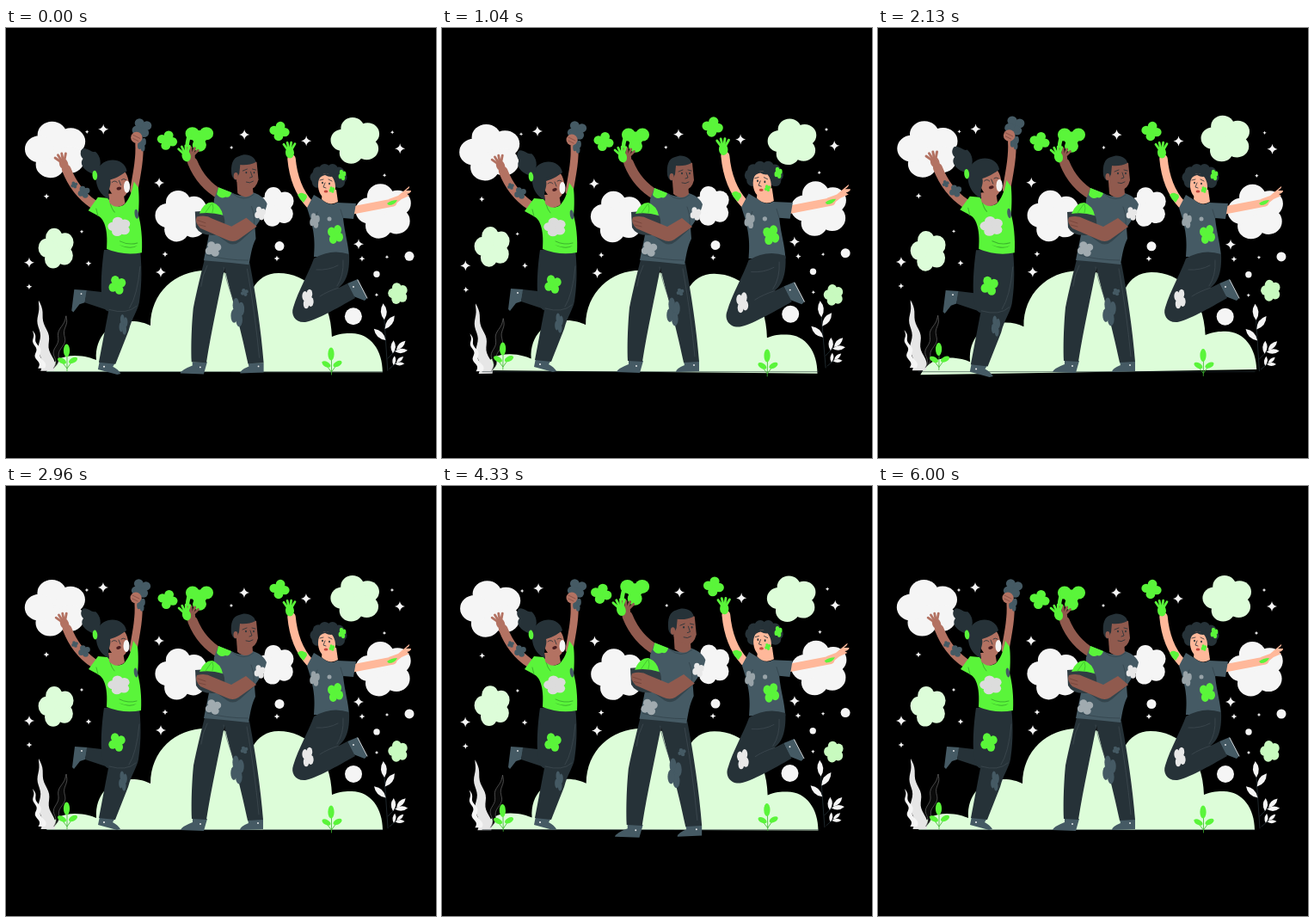
Write an HTML page that moves like this. It is 500 px wide and 500 px high and loops after 6.04 s.

```html
<!DOCTYPE html>
<html lang="en">
<head>
<meta charset="utf-8">
<title>Celebration</title>
<style>
html, body { margin: 0; height: 100%; overflow: hidden; background: #000; }
svg { display: block; width: 100vw; height: 100vh; }
</style>
</head>
<body>
<svg id="stage" viewBox="0 0 500 500"></svg>
<script>
const GREEN = '#5af53a', LEAF = '#3cb52d', MINT = '#ddfdd9', WHITE = '#f5f5f5', GREY = '#dcdcdc', DARK = '#263238',
  SLATE = '#455a64', FOLD = '#34454d', TAN = '#b37262', BROWN = '#905a4e', PEACH = '#ffb89a';

const fill = (color, d) => `<path fill="${color}" d="${d}"/>`;
const line = (color, width, d) =>
  `<path fill="none" stroke="${color}" stroke-width="${width}" stroke-linecap="round" stroke-linejoin="round" d="${d}"/>`;
const oval = (color, x, y, rx, ry = rx, turn = 0) =>
  `<ellipse fill="${color}" rx="${rx}" ry="${ry}" transform="translate(${x} ${y}) rotate(${turn})"/>`;
const repeat = (n, make) => Array.from({ length: n }, (_, i) => make(i)).join('');
const group = (id, ...parts) => `<g id="${id}">${parts.join('')}</g>`;

// A blob of half-size w by h: round lobes on a ring.
const puff = (color, x, y, w, h, turn = -105, n = 5) => oval(color, x, y, w * .5, h * .5) + repeat(n, i => {
  const a = turn * Math.PI / 180 + i * 2 * Math.PI / n;
  return oval(color, x + Math.cos(a) * w * .55, y + Math.sin(a) * h * .55, w * .47, h * .47);
});
const stain = (color, x, y, w, h = w, turn = -115) => puff(color, x, y, w, h, turn, 4);

const hand = (color, x, y, turn) => `<g transform="translate(${x} ${y}) rotate(${turn})">` +
  oval(color, 0, 0, 5, 6.5) +
  repeat(4, i => `<g transform="rotate(${i * 22 - 33})">${line(color, 2.8, 'M0 -3V-12')}</g>`) + '</g>';

const star = (x, y, r) => fill(WHITE, `M${x} ${y - r}` +
  [[1, -1, r, 0], [1, 1, 0, r], [-1, 1, -r, 0], [-1, -1, 0, -r]].map(([sx, sy, dx, dy]) =>
    `Q${x + sx * r * .13} ${y + sy * r * .13} ${x + dx} ${y + dy}`).join(''));
const stars = (r, points) => points.split(' ').map(p => star(...p.split(',').map(Number), r)).join('');

const leaf = (x, y, size, turn) => `<path fill="${WHITE}" transform="translate(${x} ${y}) rotate(${turn})"
  d="M0 0Q${size * .36} ${-size / 2} 0 ${-size}Q${-size * .36} ${-size / 2} 0 0"/>`;

// A twig with leaves on alternate sides and one at its tip.
const sprig = (x, y, x2, y2, size) => {
  const lean = Math.atan2(x2 - x, y - y2) * 180 / Math.PI;
  const at = (t, turn) => leaf(x + (x2 - x) * t, y + (y2 - y) * t, size, lean + turn);
  return line(DARK, .8, `M${x} ${y}L${x2} ${y2}`) + at(.6, -42) + at(.82, 40) + at(1, 0);
};

// A wavy blade that widens from its tip to the root.
const blade = (style, x, y, x2, y2, width, bulge = .7) => {
  const side = s => Array.from({ length: 25 }, (_, i) => {
    const t = i / 24, half = width * (bulge < 0 ? Math.sin(t * Math.PI) : t ** bulge);
    return `${x + (x2 - x) * t + Math.sin(t * 16) * 2 * t ** .3 + s * half} ${y + (y2 - y) * t}`;
  });
  return `<path ${style} d="M${[...side(-1), ...side(1).reverse()].join('L')}Z"/>`;
};

const sprout = (x, y) =>
  line(LEAF, .8, `M${x} ${y}v25m-7 -12l7 9l7 -10`) +
  oval(GREEN, x - .5, y + 1, 3.6, 7.5) + oval(GREEN, x - 6, y + 13, 5.5, 3, 30) + oval(GREEN, x + 7, y + 12.5, 5.5, 3, -28);

const hills = group('hills',
  fill(MINT, `M47 400C55 386 66 381 80 381C92 381 100 384 105 386C103 358 122 341 146 341
    C155 341 162 343 168 346C168 308 197 282 232 282C258 282 276 291 287 303
    C293 292 303 285 317 285C350 285 378 312 379 359C388 355 396 355 402 355C424 355 438 375 438 400Z`),
  puff(MINT, 407, 131, 29, 27), puff(MINT, 59, 256.5, 21, 23.5), puff('#c8fabf', 456, 308.5, 11.5, 12.5));

const air = group('air',
  puff(WHITE, 58.5, 142, 36, 33), puff(WHITE, 204.5, 219, 30.5, 30),
  puff(WHITE, 314, 208, 22, 23), puff(WHITE, 440, 213, 33, 32),
  oval(WHITE, 318, 253.5, 5.5), oval(WHITE, 469, 265, 5.5), oval(WHITE, 431, 286, 3.7), oval(WHITE, 404, 335, 10),
  stars(6, '113,118 178,180 180,284 27,273 277,124 349,131 458,140 410,251'),
  stars(3.5, '47,196 185,263 96,274 27,301 414,268 315,268'),
  stars(2.2, '94,121 88,237 262,139 216,202 449,121 440,171 443,266 431,310'),
  blade('fill="#e6e6e6"', 38, 317, 49, 399, 8), blade(`fill="${WHITE}"`, 31, 352, 42, 396, 4),
  blade('fill="#0a0a0a" stroke="#777" stroke-width=".6"', 70, 335, 56, 396, 4, -1),
  sprig(444, 398, 440, 339, 19), sprig(444, 384, 454, 374, 15), sprig(446, 396, 454, 389, 11));

const sprouts = group('sprouts', sprout(71, 374), sprout(378.5, 378));

const dancer = group('dancer',
  line(TAN, 10.5, 'M71 166Q81 192 102 206'), hand(TAN, 68, 160, -22),
  line(TAN, 9, 'M148 190C152 168 155 152 154 137'),
  stain(SLATE, 80, 184, 4), stain(SLATE, 91, 192, 7),
  stain(SLATE, 157, 119, 11.5, 11), stain(SLATE, 157, 137, 5, 9),
  oval(TAN, 151, 130, 6.5), line('#7a463d', .7, 'M147 127l8 4m-8 0l6 3'),
  fill(SLATE, 'M80 303L95 304L92 318L86 320L79 329L77 327Z'), oval(WHITE, 88, 308, .9),
  fill(DARK, 'M94 304L120 307L122 328L92 318Z'),
  fill(SLATE, 'M109 384L127 386L124 391Q130 394 133 399L129 400L107 394Z'), oval(WHITE, 114, 391, 1),
  fill(DARK, 'M114 258L155 257C158 285 156 305 154 318C152 328 146 335 142 350L127 388L108 386L119 328C106 326 112 270 114 258Z'),
  line('#455158', .6, 'M120 326Q140 332 151 322M155 277Q152 310 143 324'),
  stain(SLATE, 136, 343, 5, 12), stain(GREEN, 129, 298, 10, 11),
  fill(GREEN, `M107 198L96 213L107 219C113 222 119 232 117 257Q137 265 157 261
    C158 245 156 228 153 218C154 208 154 195 153 187L148 180C146 192 142 202 136 207Q127 212 118 199Z`),
  line(LEAF, 1, 'M132 248Q142 253 152 250M107 219L105 211M121 205Q123 212 126 215'),
  fill(LEAF, 'M131 252Q143 257 152 253Q145 259 131 252'),
  oval(SLATE, 151, 217, 2.2, 5.5, -8), puff(GREY, 131.5, 231.5, 13, 11),
  fill(TAN, 'M119 194L120 204Q128 213 138 205L136 193Z'), oval(TAN, 130, 181, 12, 18, -10),
  fill(DARK, 'M140 168C137 152 112 151 106 168C102 180 108 196 120 200C117 190 123 185 121 178C129 176 136 171 140 168Z'),
  fill(DARK, 'M89 143C94 140 100 148 104 146C110 151 112 160 107 169L101 171C92 168 85 160 90 154C86 150 87 146 89 143Z'),
  oval(GREEN, 103.5, 173, 2.8, 5.5, -5), oval(WHITE, 140, 186, 3.5, 7),
  line(DARK, .8, 'M123 181q3 -3 6 0m5 -3q2 -2 5 0m-17 -4l6 -2m5 -1l3 -1m-5 9l2 5'),
  oval('#4a1e20', 131, 188, 2.8, 1.8, -15));

const man = group('man',
  stain(GREEN, 188, 132, 11.5, 11, -75),
  puff(GREEN, 225, 128.5, 17, 16, -150, 3), line(GREEN, 4.5, 'M214 125Q210 134 211 146'),
  line(BROWN, 11.5, 'M250 195Q227 182 217 157'), hand(BROWN, 215, 152, 12), hand(GREEN, 210, 150, -15),
  fill(SLATE, 'M217 387H234L230 401L203 400Q204 396 217 391Z'), oval(WHITE, 226, 393, .9),
  fill(SLATE, 'M281 388H299V399L272 400Q272 396 282 392Z'), oval(WHITE, 293, 392, .9),
  fill(DARK, 'M231 269L283 273C290 310 296 350 299 388L281 389C272 345 260 305 254 279C248 310 239 350 233 388L216 387C215 360 217 335 218 325C222 305 227 285 231 269Z'),
  line('#455158', .6, 'M253 278Q256 295 264 315M234 276Q228 288 227 300M280 280Q289 330 294 382'),
  stain(SLATE, 277, 307, 4.5), stain(SLATE, 269, 330, 8, 17),
  fill(SLATE, `M247 186L262 192Q277 200 287 192C296 195 301 200 303 205C301 215 295 224 289 232
    L290 245C285 255 284 265 282 275Q256 272 230 270C234 250 240 225 242 199Z`),
  line(FOLD, .8, 'M263 193Q276 204 288 194M285 208Q289 218 288 230M234 264Q256 270 281 270'),
  fill(GREEN, 'M247 186L262 192Q260 199 255 197Q249 200 245 194Z'),
  stain('#a1abb0', 241, 257, 9.5, 9), stain('#e8e8e8', 295, 216, 6.5, 8),
  fill('#303d43', 'M220 214Q236 212 253 219Q258 236 243 241Q226 242 221 232Z'),
  fill(GREEN, 'M225 216Q230 203 240 203Q250 207 252 218Q238 214 225 216Z'),
  line(LEAF, .7, 'M232 215L239 205M240 204Q242 210 240 215'),
  fill(FOLD, 'M238 236L258 250Q265 254 272 248L291 231Z'),
  fill(BROWN, 'M222 220Q232 217 240 222L262 231L279 221L291 231L270 246Q264 250 256 246L226 233Q219 226 222 220Z'),
  line('#6f4037', .7, 'M223 224l9 3m-8 2l8 2'),
  fill(BROWN, 'M268 178L269 193Q279 201 287 193L286 180Z'),
  fill(BROWN, 'M266 162Q278 150 291 157L293 177Q290 188 283 188Q272 187 268 179Z'),
  fill(DARK, 'M262 171C261 160 263 152 271 150C279 146 289 150 290 157Q282 161 272 160L271 170L267 178Q263 176 262 171Z'),
  oval(BROWN, 267, 173, 2.5, 4),
  line(DARK, .8, 'M275 167l5 -2m6 0l4 1m-6 2l2 6l-3 1m-4 5q4 2 8 -1'),
  oval(DARK, 279, 169, .9, 1.2), oval(DARK, 288, 169, .8, 1.2));

const jumper = group('jumper',
  stain(GREEN, 318, 120, 11.5, 11, -80),
  line(PEACH, 9.5, 'M332 152Q335 185 353 205'), hand(GREEN, 330, 145, -3),
  fill(GREEN, 'M339 194Q343 190 347 193Q350 193 350 197L346 203Q341 199 339 194Z'),
  line(PEACH, 9, 'M403 212L450 203'),
  fill(PEACH, 'M445 199L456 195L469 184Q470 186 465 189L471 189Q471 192 466 193L469 195L460 199L450 207Z'),
  fill(GREEN, 'M443 204Q448 200 455 200Q452 206 445 206Z'),
  fill(SLATE, 'M397 297L409 292L420 314L417 317L404 312Z'),
  line(WHITE, .8, 'M409 293L420 314'), oval(WHITE, 404, 301, .9),
  fill(SLATE, 'M358 194L368 200Q377 208 385 203L407 204L404 222L392 221C394 240 398 250 399 266H358C360 245 357 235 355 225L350 209Z'),
  fill(DARK, 'M358 268Q378 256 399 263C400 285 395 297 385 303L397 297L406 314C385 326 360 340 348 342C336 343 331 333 334 325C340 305 352 285 358 268Z'),
  line('#455158', .6, 'M361 281Q375 282 386 276M387 302Q374 306 365 312M392 270Q393 288 385 300'),
  stain('#e8e8e8', 351, 315, 7, 12, -60),
  line(FOLD, .8, 'M392 221L389 211M358 226L362 214'),
  stain('#98a3a8', 359, 224, 6, 9), oval('#98a3a8', 376, 222, 2.5), stain(GREEN, 383, 240, 9.5, 11.5, -60),
  oval(DARK, 374, 174, 18, 13), repeat(8, i => {
    const a = Math.PI * (.82 + i * .195);
    return oval(DARK, 375 + Math.cos(a) * 15, 174 + Math.sin(a) * 10, 6.5);
  }),
  fill(PEACH, 'M368 190L367 199Q376 208 386 202L384 188Z'), oval(PEACH, 373, 184, 10, 15, -6),
  fill(DARK, 'M362 177Q364 165 383 171Q378 175 371 171Q366 172 362 177Z'),
  stain(GREEN, 391, 171, 4.5, 6.5), stain(GREEN, 379, 188, 3.5, 4),
  line(DARK, .8, 'M365 177l4 -1m6 0l4 2m-8 2l-2 5l3 1'),
  oval(DARK, 368, 180, .9, 1.3), oval(DARK, 376, 181, .9, 1.3), oval('#c4473f', 372, 190, 2.4, 1.6));

document.getElementById('stage').innerHTML =
  hills + air + line(DARK, .6, 'M47 399.7H438') + sprouts + dancer + man + jumper;

const LOOP = 6040, LAG = 30, END = 6000;
const phase = (t, period) => t % period / period;

// Linear sway: 0 -> +1 -> -1 -> 0 degrees.
const sway = p => p < .25 ? p * 4 : p < .75 ? 2 - p * 4 : p * 4 - 4;

// Two beats per period, the first with a longer fall.
const beat = p => {
  const bump = (from, top, to) => Math.max(0, Math.min((p - from) / (top - from), (to - p) / (to - top)));
  return 1 + .1 * (bump(0, .1, .3) + bump(.4, .5, .6));
};

const set = (id, value) => document.getElementById(id).setAttribute('transform', value);
const turn = (id, t, period, x, y) => set(id, `rotate(${sway(phase(t, period))} ${x} ${y})`);
const pulse = (id, t, period, x, y) =>
  set(id, `translate(${x} ${y}) scale(${t < 0 ? 1 : beat(phase(t, period))}) translate(${-x} ${-y})`);

const start = performance.now();
function draw(now) {
  const t = Math.min(Math.max(0, now - start) % LOOP + LAG, END);
  turn('hills', t, 3000, 252, 252);
  turn('air', t, 1500, 249, 254);
  turn('sprouts', t, 6000, 225, 384);
  pulse('dancer', t, 1500, 112, 254.5);
  pulse('man', t, 3000, 240, 257);
  pulse('jumper', t - 1000, 1500, 389, 225.5);
  requestAnimationFrame(draw);
}
draw(start);
</script>
</body>
</html>
```
